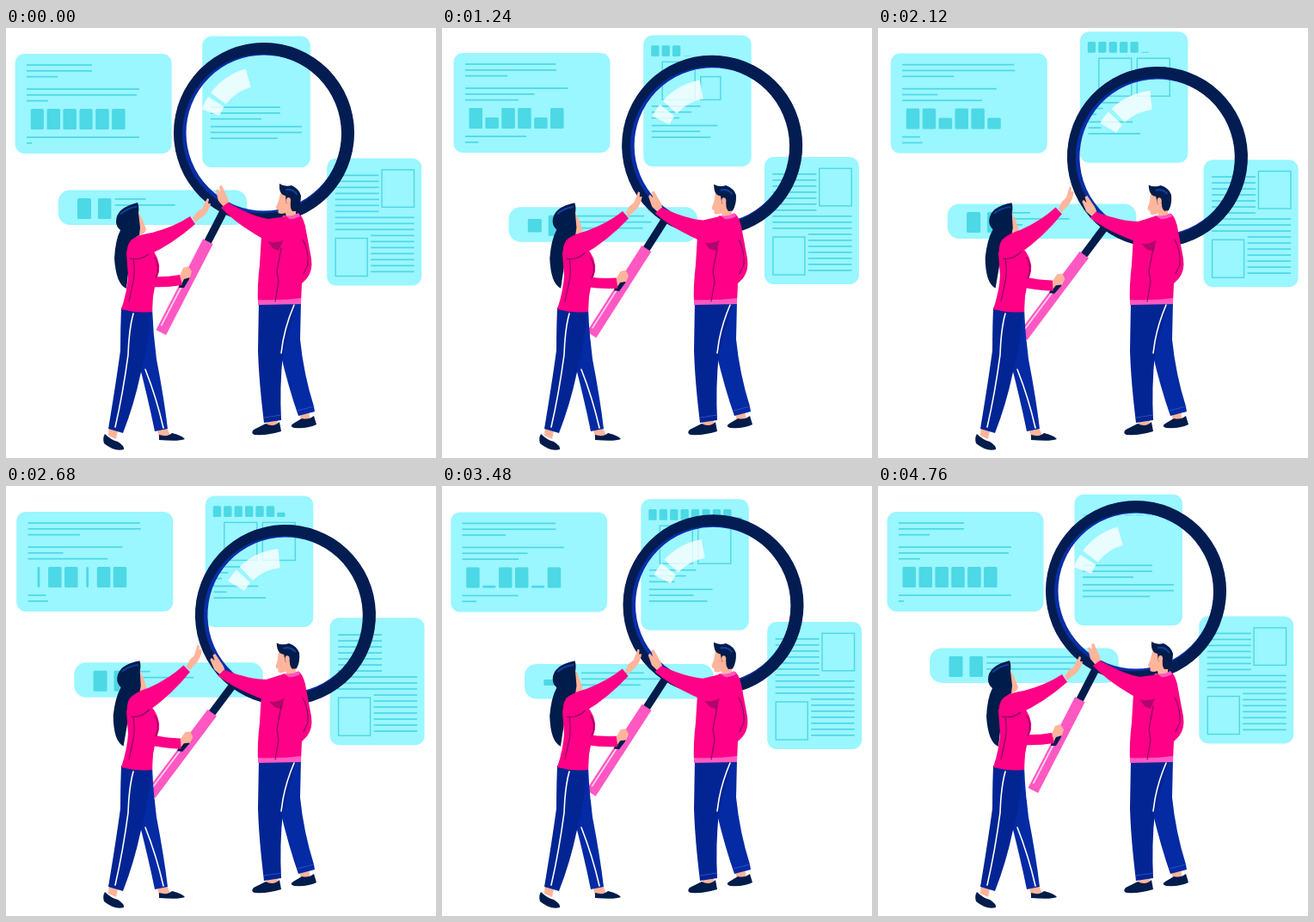
Write an HTML page that moves like this. It is 500x500 px and loops after 4800 ms.

```html
<!DOCTYPE html>
<html lang="en">
<head>
<meta charset="utf-8">
<title>Document search</title>
<style>
  html, body { margin: 0; width: 100%; height: 100%; overflow: hidden; background: #fff; }
  svg { display: block; width: 100vw; height: 100vh; }
  .navy { fill: #001c4b; }
  .skin { fill: #ffb59b; }
  .pink { fill: #ff0086; }
  .trim { fill: #ff58c2; }
  .denim { fill: #032594; }
  .far { fill: #042aa4; }
  .fold { fill: none; stroke: #6d0a55; stroke-width: 1; stroke-linecap: round; }
  .seam { fill: none; stroke: #fff; stroke-width: 1.6; stroke-linecap: round; }
  .sheen { fill: none; stroke: #0d3f9c; stroke-width: 2.2; stroke-linecap: round; }
</style>
</head>
<body>
<svg id="stage" viewBox="0 0 500 500">
  <g id="cards"></g>

  <g id="lens">
    <g transform="translate(300 122)">
      <g transform="rotate(27.3)">
        <path class="navy" d="M-4.5 100H4.5V146H-4.5Z"/>
        <path class="trim" d="M-6.5 142H6.5V261H-6.5Z"/>
        <path d="M-3.4 195V254" stroke="#ffd3ef" stroke-width="1.8"/>
      </g>
      <circle r="97.5" fill="none" stroke="#0a2ea6" stroke-width="14"/>
      <path fill="#031d52" fill-rule="evenodd"
        d="M-105 0a105 105 0 1 0 210 0a105 105 0 1 0-210 0ZM-95 1a92.5 92.5 0 1 0 185 0a92.5 92.5 0 1 0-185 0Z"/>
      <g id="glare" fill="none" stroke="#fff" stroke-width="22" stroke-opacity=".78"></g>
    </g>
  </g>

  <g id="man">
    <path class="skin" d="M303 454H316V466H303ZM341 446L352 444L354 458L343 458Z"/>
    <path class="navy" d="M302 460Q311 465 318 458L320 469Q305 474 289 473Q284 471 288 467Z"/>
    <path class="navy" d="M344 454Q352 456 358 451L361 461Q352 466 335 465Q329 463 334 460Z"/>
    <path class="far" d="M318 318L343 318L342 362Q346 402 358 440L359 446L340 451Q329 420 319 378Z"/>
    <path class="denim" d="M294 318L338 318Q331 345 322 378Q318 418 320 456L300 459Q294 410 293 375Z"/>
    <path class="seam" d="M335 322Q323 350 320 378"/>
    <path d="M339 445L358 440M300 453L320 450" stroke="#3559d0" stroke-width=".8"/>
    <path class="pink" d="M322 219L341 216Q347 222 349 236L355 268Q357 282 350 291L344 297L343 319L293 320Q292 300 295 275L297 242Z"/>
    <path class="trim" d="M293 316Q320 317 343 314L343 321L293 322Z"/>
    <path class="fold" d="M320 256L315 283L317 295L313 318M345 246Q352 258 351 275L346 286"/>
    <g id="manHead">
      <path class="skin" d="M319 192L317 201L314 208Q314 211 316.5 211L316.5 215Q320 217 325 215L326 220L337 218V195Z"/>
      <path class="navy" d="M318 181Q324 185 332 183Q341 187 343 195Q343 206 338 213L333 213Q330 209 331 204L326 204L325 195Q317 194 318 181Z"/>
      <ellipse class="skin" cx="328.5" cy="201" rx="2.6" ry="4"/>
      <path class="sheen" d="M326 188Q334 187 338 193"/>
    </g>
    <path class="trim" d="M322 218Q332 220 340 215L342 219Q332 224 321 222Z"/>
    <g id="manArm">
      <path class="skin" d="M253 208L247 201L244 189L246 187L249 191L248 184L251 183L256 194Q259 199 259 206Z"/>
      <path class="pink" d="M258 203Q286 219 305 222L326 219Q338 228 335 242L321 254Q306 250 290 240Q265 225 250 209Z"/>
      <path d="M304 248Q312 251 322 247L317 259L310 256Z" fill="#7d0a58" opacity=".6"/>
    </g>
  </g>

  <g id="woman">
    <path class="skin" d="M120 462L131 464L128 478L119 474ZM175 464L186 462L191 474L178 476Z"/>
    <path class="navy" d="M115 472Q122 479 130 481Q138 486 137 490Q126 493 114 483Q112 477 115 472Z"/>
    <path class="navy" d="M178 473Q188 476 193 471Q205 474 208 478Q201 481 178 479Z"/>
    <path class="far" d="M144 326L170 326Q171 355 175 385Q184 432 188 466L173 469Q165 430 154 388Z"/>
    <path class="denim" d="M134 325L169 326Q166 365 157 400Q149 438 136 471L119 466Q128 412 133 375Q133 350 134 325Z"/>
    <path class="seam" d="M148 332Q143 350 142 380Q136 425 127 464M162 397Q175 430 183 465"/>
    <g id="foreArm">
      <path class="navy" d="M203 290L214 283L213 292L207 302L201 302Z"/>
      <path class="skin" d="M202 288L206 279L212 277L216 283L214 290L207 292L204 298Z"/>
      <path class="pink" d="M168 289Q185 290 202 287L205 299Q186 302 168 301Z"/>
    </g>
    <g id="womanHead">
      <path class="skin" d="M152 212L158 221L163 234Q162 239 157 240L157 246L146 248L148 226Z"/>
      <path class="navy" d="M128 225Q128 209 153 203Q155 208 154 215L156 232L155 241Q147 244 145 254Q143 280 140 303Q128 298 126 268Q127 247 133 235Q128 231 128 225Z"/>
      <path class="sheen" d="M134 216Q142 209 151 208"/>
    </g>
    <path class="pink" d="M143 250Q150 242 161 240L167 254Q180 268 178 283Q173 298 171 312L170 330Q152 332 134 327Q141 306 142 288L140 262Z"/>
    <path class="fold" d="M148 268Q151 285 147 299L143 318M173 267Q180 278 174 291"/>
    <g id="womanArm">
      <path class="skin" d="M217 221L222 214L228 210L234 198L236 199L235 204L238 204Q236 213 229 219L220 226Z"/>
      <path class="pink" d="M146 246Q155 240 170 238Q196 231 214 219L220 228Q194 251 164 265Q148 274 141 266Q139 254 146 246Z"/>
      <path class="fold" d="M144 268Q156 271 166 263"/>
    </g>
  </g>
</svg>
<script>
const LOOP = 4800, STEP = 40;
const INK = '#4cd8e5', PAPER = '#9af6ff';
const $ = id => document.getElementById(id);

function set(node, attrs) {
  for (const key in attrs) node.setAttribute(key, attrs[key]);
}
function el(tag, attrs, parent) {
  const node = document.createElementNS('http://www.w3.org/2000/svg', tag);
  set(node, attrs);
  return parent.appendChild(node);
}

const mix = (a, b, k) => a + (b - a) * k;
const ramp = (t, a, b) => Math.max(0, Math.min(1, (t - a) / (b - a)));
// There and back once per loop
const swing = t => 0.5 - 0.5 * Math.cos(2 * Math.PI * t / LOOP);

// Smooth bump around a centre time, repeated every period
function bump(t, centre, half = 400, period = LOOP / 2) {
  const d = Math.abs((t - centre + period * 1.5) % period - period / 2);
  return d < half ? 0.5 + 0.5 * Math.cos(Math.PI * d / half) : 0;
}

// Smooth closed path through a few points
const BEATS = [0, 1240, 2120, 2680, 3480, 4240];
function along(points, t) {
  const n = points.length;
  const time = i => BEATS[(i + n) % n] + LOOP * Math.floor(i / n);
  const i = BEATS.findLastIndex(beat => beat <= t);
  const span = time(i + 1) - time(i), u = (t - time(i)) / span, w = 1 - u;
  return [0, 1].map(axis => {
    const at = j => points[(j + n) % n][axis];
    const slope = j => span * (at(j + 1) - at(j - 1)) / (time(j + 1) - time(j - 1));
    return at(i) * (1 + 2 * u) * w * w + slope(i) * u * w * w
      + at(i + 1) * u * u * (3 - 2 * u) - slope(i + 1) * u * u * w;
  });
}

const updates = [];

function card(width, height, rx, points) {
  const g = el('g', {}, $('cards'));
  el('rect', { width, height, rx, fill: PAPER }, g);
  updates.push(t => set(g, { transform: `translate(${along(points, t)})` }));
  return g;
}
function line(g, x, y, width) {
  const node = el('rect', { x, y: y - 0.8, height: 1.7, fill: INK }, g);
  updates.push(t => set(node, { width: width(t) }));
}
// A paragraph of [from, to] widths that breathe with the swing
function paragraph(g, x, y, widths) {
  widths.forEach(([a, b], i) => line(g, x, y + 6.8 * i, t => mix(a, b, swing(t))));
}
function block(g, rule, outline) {
  const style = outline ? { fill: 'none', stroke: INK, 'stroke-width': 1.4 } : { fill: INK, rx: 1.5 };
  const node = el('rect', style, g), least = outline ? 3 : 0.3;
  updates.push(t => {
    const [x, y, width, height] = rule(t);
    const visibility = Math.min(width, height) > least ? 'visible' : 'hidden';
    set(node, { x, y, width, height, visibility });
  });
}

// Report with bars that collapse in turn
const report = card(182, 116, 11,
  [[10.6, 30], [13.5, 29], [14.8, 29.6], [12.2, 30], [10.2, 30.4], [11.5, 30.5]]);
paragraph(report, 13.4, 13, [[76, 132], [76, 133], [36, 61]]);
paragraph(report, 13.4, 41, [[131, 109], [128, 38], [25, 95]]);
paragraph(report, 13.4, 97, [[131, 17], [6, 24]]);
for (let i = 0; i < 6; i++) {
  const kind = i % 3, x = 18 + 18.9 * i;
  block(report, t => {
    const s = 1 - 0.91 * bump(t, 360 + 780 * kind - 100 * (kind % 2));
    return kind ? [x, 88 - 24 * s, 15.5, 24 * s] : [x + 7.75 * (1 - s), 64, 15.5 * s, 24];
  });
}

// Tall page behind the glass
const page = card(125.5, 152.5, 11,
  [[228.3, 9.6], [234.2, 8.4], [234.8, 4.2], [231.8, 11.4], [231.3, 15.2], [235.6, 15.2]]);
paragraph(page, 9.6, 82.5, [[81, 35], [81, 15], [59, 8]]);
paragraph(page, 9.6, 105, [[106, 50], [106, 12], [78, 60]]);
for (let i = 0; i < 9; i++) {
  const start = 430 * i - 60;
  block(page, t => {
    const h = 12.6 * ramp(t, Math.max(0, start), start + 400) * (1 - ramp(t, 4200, 4800));
    return [9 + 12.4 * i, 24.5 - h, 9.3, h];
  });
}
for (let i = 0; i < 2; i++) {
  const start = 500 + 350 * i;
  block(page, t => {
    const s = ramp(t, start, start + 640) * (1 - ramp(t, 3900, 4740));
    return [22 + 44.5 * i, 75 - 44 * s, 38 * s, 44 * s];
  }, true);
}

// Short strip: lines type in, then pull back and return
const strip = card(219.5, 40.5, 14,
  [[60.7, 188.5], [77.5, 208.3], [80.8, 204.5], [79.3, 205.3], [96, 207], [58.5, 198]]);
[[36, 20], [70, 72], [0, 10]].forEach(([first, least], i) => line(strip, 66, 10.3 + 7 * i, t =>
  Math.min(mix(first, 105, ramp(t, 0, 1000)), mix(105, least, bump(t, 2500, 1700, LOOP)))));
block(strip, t => {
  const h = 24 * (1 - 0.72 * bump(t, 1040));
  return [22.3, 21.5 - h / 2, 16, h];
});
block(strip, () => [46.2, 9.5, 15.5, 24]);

// Article with two pictures
const article = card(110, 148, 11,
  [[373.2, 151.5], [374.9, 150], [378.6, 153.2], [376.6, 153.2], [378.2, 158], [376, 153]]);
for (let i = 0; i < 10; i++) line(article, 9.5, 19.8 + 7 * i, () => i < 7 ? 51 : 92);
for (let i = 0; i < 7; i++) line(article, 51, 89.8 + 7 * i, () => 50.5);
block(article, t => {
  const w = 37.5 * (1 - bump(t, 2690, 400, LOOP));
  return [82.6 - w / 2, 13.3, w, 43.5];
}, true);
block(article, () => [10, 93, 37, 44], true);

// Curved glints, angles measured from the left
const polar = a => {
  const p = a * Math.PI / 180;
  return `${-66.5 * Math.cos(p)} ${-66.5 * Math.sin(p)}`;
};
[[21, 33], [37, 74]].forEach(([a, b]) =>
  el('path', { d: `M${polar(a)}A66.5 66.5 0 0 1 ${polar(b)}` }, $('glare')));

// Joints swing together: id, degrees, pivot
const joint = (id, turn, x, y) => updates.push(t =>
  set($(id), { transform: `rotate(${turn * swing(t)} ${x} ${y})` }));
joint('lens', 9.9, 145, 285);
joint('womanArm', -10, 148, 258);
joint('foreArm', 11, 168, 295);
joint('womanHead', 3.5, 148, 245);
joint('manArm', -9.5, 322, 237);
joint('manHead', -6, 331, 214);

const draw = t => updates.forEach(update => update(t));

let begin;
function tick(now) {
  begin ??= now;
  draw(Math.floor(((now - begin) % LOOP) / STEP) * STEP);
  requestAnimationFrame(tick);
}
draw(0);
requestAnimationFrame(tick);
</script>
</body>
</html>
```
